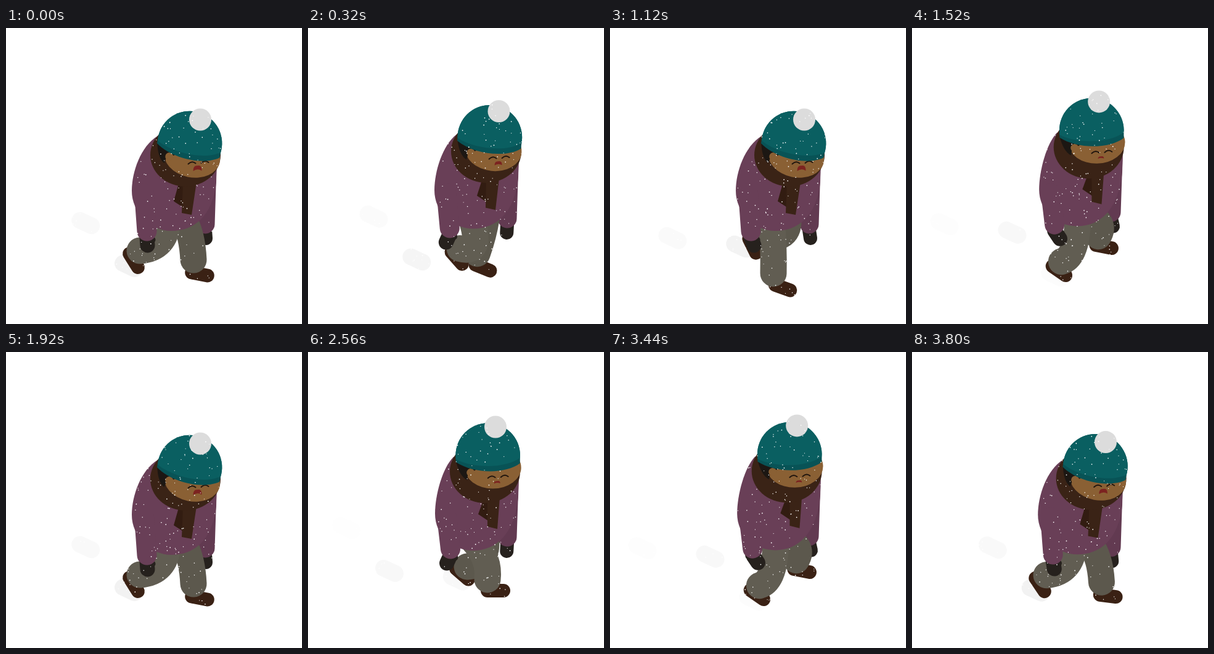
These frames come from a looping animation (480 by 480 pixels, 3.84 s). An HTML page with a canvas:

```html
<!DOCTYPE html>
<html lang="en">
<head>
<meta charset="utf-8">
<title>Walking in the snow</title>
<style>
  html, body { margin: 0; width: 100%; height: 100%; overflow: hidden; background: #fff; }
  canvas { display: block; width: 480px; height: 480px; }
</style>
</head>
<body>
<canvas id="stage" width="480" height="480"></canvas>
<script>
const ctx = document.getElementById('stage').getContext('2d');
const TAU = Math.PI * 2;
const LOOP = 3840, CYCLE = 1920, STEP = 960, TICK = 40;
const FAR = [20, -26];
const COLOR = {
  coat: '#693f57', coatFar: '#623a51', pants: '#615d52', pantsFar: '#5c584d',
  boot: '#3a2114', glove: '#26211d', scarf: '#3a2316', scarfBack: '#321c11',
  skin: '#8a6034', hair: '#1c1713', hat: '#0a5f61', band: '#085356',
  pom: '#dcdcdc', line: '#20150e', mouth: '#7c2320'
};

// Near leg: time, boot x, y, tilt in degrees, ankle x, y, knee x, y
const GAIT = [
  [0,    207, 377, 58, 217, 361, 260, 358],
  [160,  211, 379, 64, 222, 362, 270, 374],
  [400,  258, 372, 38, 259, 357, 290, 362],
  [640,  304, 387,  0, 291, 369, 295, 335],
  [800,  307, 404, -3, 294, 385, 292, 345],
  [960,  294, 425, 11, 284, 402, 282, 361],
  [1120, 280, 421, 20, 265, 398, 266, 355],
  [1360, 255, 410, 24, 250, 388, 266, 365],
  [1600, 230, 386, 41, 238, 374, 270, 372],
  [1760, 213, 380, 50, 225, 366, 265, 364]
];

const mix = (a, b, k) => a + (b - a) * k;
const mod = (a, n) => ((a % n) + n) % n;

function gaitKey(i) {
  const n = GAIT.length, row = GAIT[mod(i, n)];
  return [row[0] + Math.floor(i / n) * CYCLE, ...row.slice(1)];
}

// Smooth cyclic curve through the gait keys
function gaitAt(time) {
  const t = mod(time, CYCLE);
  let i = GAIT.length - 1;
  while (GAIT[i][0] > t) i--;
  const [a, b, c, d] = [i - 1, i, i + 1, i + 2].map(gaitKey);
  const span = c[0] - b[0], k = (t - b[0]) / span, k2 = k * k, k3 = k2 * k;
  return b.slice(1).map((p, j) => {
    const q = c[j + 1];
    const m0 = (q - a[j + 1]) / (c[0] - a[0]) * span;
    const m1 = (d[j + 1] - p) / (d[0] - b[0]) * span;
    return (2 * k3 - 3 * k2 + 1) * p + (k3 - 2 * k2 + k) * m0 +
           (3 * k2 - 2 * k3) * q + (k3 - k2) * m1;
  });
}

function stroke(color, width, trace) {
  ctx.strokeStyle = color;
  ctx.lineWidth = width;
  ctx.lineCap = ctx.lineJoin = 'round';
  ctx.beginPath();
  trace();
  ctx.stroke();
}

function fill(color, trace) {
  ctx.fillStyle = color;
  ctx.beginPath();
  trace();
  ctx.fill();
}

function bar(color, width, x0, y0, x1, y1) {
  stroke(color, width, () => { ctx.moveTo(x0, y0); ctx.lineTo(x1, y1); });
}

function oval(color, x, y, rx, ry = rx, turn = 0) {
  fill(color, () => ctx.ellipse(x, y, rx, ry, turn, 0, TAU));
}

function polygon(color, points) {
  fill(color, () => points.forEach(([x, y]) => ctx.lineTo(x, y)));
}

function tiltedBar(color, width, x, y, half, degrees) {
  const a = degrees * Math.PI / 180, dx = half * Math.cos(a), dy = half * Math.sin(a);
  bar(color, width, x - dx, y - dy, x + dx, y + dy);
}

// Ground covered, in pixels along x: a steady pace with a surge in each step
function travel(t) {
  const p = t / STEP;
  return 89.75 * (p - 0.092 * Math.sin(TAU * p));
}

function printStrength(age) {
  const keys = [[-480, 0], [-320, 0.5], [-40, 1], [160, 0.9], [640, 0.5], [1120, 0.4], [1600, 0.1], [1760, 0]];
  for (let i = 1; i < keys.length; i++) {
    const [t0, v0] = keys[i - 1], [t1, v1] = keys[i];
    if (age >= t0 && age < t1) return mix(v0, v1, (age - t0) / (t1 - t0));
  }
  return 0;
}

function drawPrints(time, x, y) {
  const base = mod(time, CYCLE);
  for (const age of [base - CYCLE, base]) {
    const d = travel(age);
    ctx.globalAlpha = printStrength(age);
    tiltedBar('#f2f2f2', 27, x - d, y - d * 0.464, 10.4, 25);
  }
  ctx.globalAlpha = 1;
}

function drawLeg(time, hipX, hipY, color, [ox, oy]) {
  const [bx, by, tilt, ax, ay, kx, ky] = gaitAt(time);
  tiltedBar(COLOR.boot, 22, bx + ox, by + oy, 13, tilt);
  stroke(color, 43, () => {
    ctx.moveTo(hipX, hipY);
    ctx.quadraticCurveTo(kx + ox, ky + oy, ax + ox, ay + oy);
  });
}

function drawCoat(low) {
  const y = (high, deep) => mix(high, deep, low);
  const left = mix(206, 204, low), bottom = y(322, 329), side = y(262, 264);
  fill(COLOR.coat, () => {
    ctx.moveTo(mix(236, 246, low), y(170, 175));
    ctx.bezierCurveTo(218, y(188, 192), left, y(232, 234), left, side);
    ctx.bezierCurveTo(left, side + 36, 235, bottom, 268, bottom);
    ctx.bezierCurveTo(305, bottom, 335, y(295, 305), 341, y(235, 250));
    ctx.lineTo(342, y(195, 205));
  });
}

function drawScarf(low) {
  const place = points => points.map(([x0, y0, x1, y1]) => [mix(x0, x1, low), mix(y0, y1, low)]);
  polygon(COLOR.scarfBack, place([
    [285, 238, 281, 249], [276, 263, 272, 281], [294, 275, 289, 292], [302, 240, 300, 252]
  ]));
  polygon(COLOR.scarf, place([
    [291, 238, 287, 250], [311, 236, 309, 250], [307, 287, 301, 303], [291, 283, 285, 300]
  ]));
  oval(COLOR.scarf, mix(287, 291, low), mix(194, 206, low), 57, 51);
}

function drawFeatures(x, y, low) {
  ctx.save();
  ctx.translate(x - 2.5 * low, y - 3.5 * low);
  for (const [ex, ey] of [[6, 36], [27, 34.5]]) {
    stroke(COLOR.line, 1.9, () => {
      ctx.moveTo(ex - 6, ey + 1);
      ctx.quadraticCurveTo(ex, ey - 5, ex + 6, ey);
    });
  }
  const w = mix(5, 7, low), h = mix(1.5, 4, low);
  fill(COLOR.mouth, () => {
    ctx.moveTo(15 - w, 44.5 + h);
    ctx.quadraticCurveTo(15 - w, 43 - h, 15, 43 - h * 0.8);
    ctx.quadraticCurveTo(15 + w, 42 - h, 15 + w, 44 + h);
    ctx.quadraticCurveTo(15, 43.5, 15 - w, 44.5 + h);
  });
  ctx.restore();
}

function drawHead(low) {
  const x = mix(291.7, 298, low), y = mix(167.5, 187, low);
  const brim = rise => {
    ctx.arc(0, 0, 52.3, Math.PI, TAU);
    ctx.lineTo(52, 13 - rise);
    ctx.bezierCurveTo(30, 30 - rise, -22, 31 - rise, -52, 11 - rise * 0.5);
  };
  ctx.save();
  ctx.translate(x, y);
  ctx.rotate(low * 0.21);
  oval(COLOR.skin, 8, 20, 46, 34);
  fill(COLOR.hair, () => {
    ctx.moveTo(-52, 9);
    ctx.quadraticCurveTo(-46, 34, -34, 40);
    ctx.lineTo(-32, 30);
    ctx.lineTo(-20, 24);
    ctx.lineTo(-18, 10);
  });
  oval(COLOR.skin, -28, 28, 6.5);
  ctx.restore();

  drawFeatures(x, y, low);

  ctx.save();
  ctx.translate(x, y);
  ctx.rotate(low * 0.21);
  fill(COLOR.band, () => brim(0));
  fill(COLOR.hat, () => brim(9));
  ctx.restore();
  oval(COLOR.pom, mix(304, 315, low), mix(121.5, 148.5, low), 18);
}

function drawHand(x, y, lean, r) {
  bar(COLOR.glove, r * 2, x, y + 10, x + lean, y + 23);
}

// Repeatable random snow; every flake wraps a whole number of times per loop
let seed = 71;
const random = () => (seed = (seed * 16807) % 2147483647) / 2147483647;
const flakes = Array.from({ length: 920 }, () => ({
  x: random() * 480, y: random() * 480, phase: random() * TAU,
  sway: 3 + random() * 7, r: 0.6 + random() * 0.3
}));

function drawSnow(time) {
  const p = time / LOOP;
  fill('#fff', () => {
    for (const f of flakes) {
      const x = f.x + f.sway * Math.sin(TAU * p + f.phase);
      const y = mod(f.y + 480 * p, 480);
      ctx.moveTo(x + f.r, y);
      ctx.arc(x, y, f.r, 0, TAU);
    }
  });
}

function draw(time) {
  // 0 = body raised, 1 = body sunk
  const low = 0.5 + Math.cos(TAU * (time - 80) / STEP) / 1.732;
  const swing = -Math.sin(TAU * time / CYCLE);
  const hipY = mix(306, 312, low);
  const nearCuff = [mix(231, 228.5, low), mix(319.5, 329.5, low)];
  const farCuff = [323, mix(300, 318, low)];

  ctx.fillStyle = '#fff';
  ctx.fillRect(0, 0, 480, 480);
  drawPrints(time + STEP, 219, 358);
  drawPrints(time, 199, 386);

  drawHand(...farCuff, 1 + 2 * swing, 11);
  bar(COLOR.coatFar, 31, 326, mix(212, 225, low), ...farCuff);
  drawLeg(time + STEP, 289, hipY, COLOR.pantsFar, FAR);
  drawLeg(time, mix(268, 262, low), hipY, COLOR.pants, [0, 0]);
  drawCoat(low);
  drawHand(...nearCuff, 1 + 8 * swing, 12);
  oval(COLOR.glove, nearCuff[0] + 9 + 2 * swing, nearCuff[1] + 14, 5);
  bar(COLOR.coat, 32, mix(225, 224, low), 268, ...nearCuff);
  drawScarf(low);
  drawHead(low);
  drawSnow(time);
}

const start = performance.now();
function frame() {
  const elapsed = Math.max(0, performance.now() - start) % LOOP;
  draw(Math.floor(elapsed / TICK) * TICK);
  requestAnimationFrame(frame);
}
frame();
</script>
</body>
</html>
```
